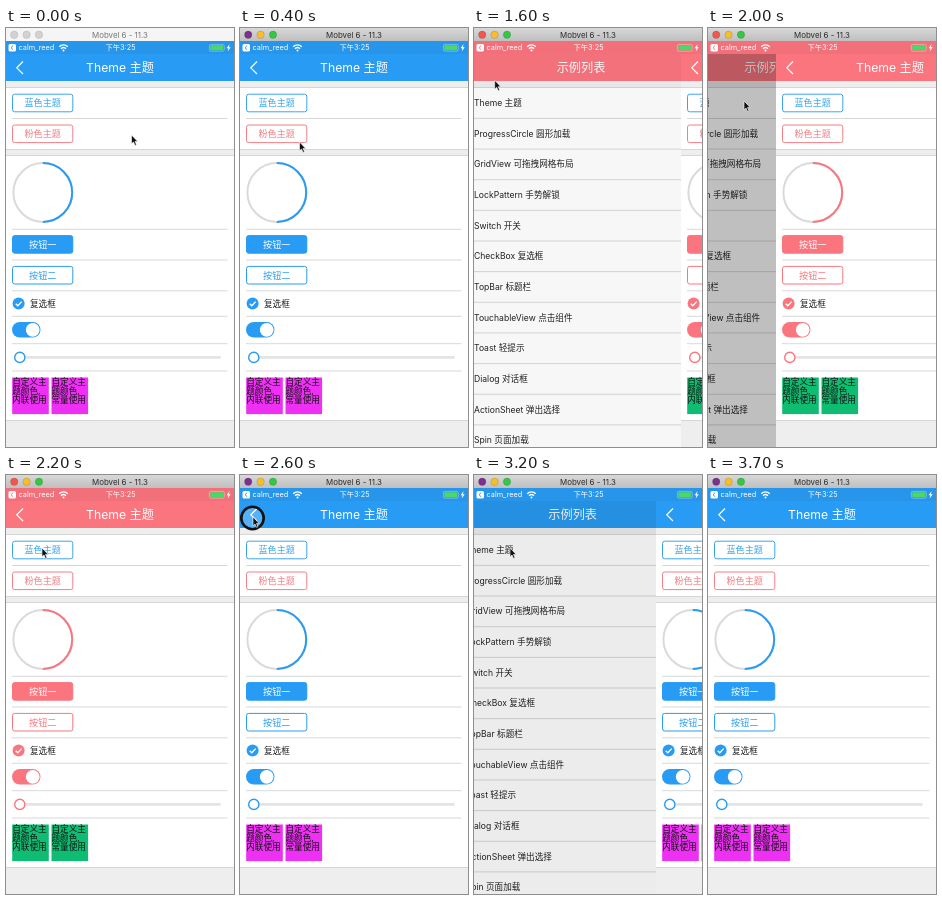
An HTML page for the animation above (3800 ms loop, 228 px wide and 419 px high).

```html
<!DOCTYPE html>
<html lang="zh-CN">
<head>
<meta charset="utf-8">
<title>Theme 主题</title>
<style>
  html, body { margin: 0; width: 100%; height: 100%; overflow: hidden; background: #eee; }
  svg { display: block; width: 100vw; height: 100vh; --main: #289bf4; --box: #ed30f3; --close: #7d3090; }
  svg.pink { --main: #fb757e; --box: #0fbd72; --close: #f0584f; }
  text { font-family: Inter, "Noto Sans CJK SC", "Noto Sans CJK", sans-serif; font-size: 8.6px; fill: #222; }
  .mid { text-anchor: middle; }
  .nav { font-size: 12.2px; fill: #fff; }
  .btn { font-size: 9.1px; }
  .fill { fill: var(--main); }
  .ink { stroke: var(--main); fill: none; }
  .line { stroke: #cfcfcf; stroke-width: .8; }
  .box { fill: var(--box); }
  .chev { stroke: #fff; stroke-width: 1.2; fill: none; }
  .status text { fill: #fff; font-size: 7.3px; }
  .idle .light { fill: #d2d2d2; stroke: #bcbcbc; }
  .idle .bar { fill: #f5f5f5; }
  .idle .name { fill: #777; }
  .light { stroke: #0003; stroke-width: .6; }
  .name { font-size: 7.9px; fill: #2b2b2b; }
</style>
</head>
<body>
<svg id="stage" viewBox="0 0 228 419" preserveAspectRatio="none">
  <defs>
    <linearGradient id="steel" x2="0" y2="1">
      <stop stop-color="#d8d8d8"/><stop offset="1" stop-color="#bfbfbf"/>
    </linearGradient>
  </defs>

  <g id="list">
    <rect y="13" width="228" height="406" fill="#fff"/>
    <rect y="53" width="228" height="6.5" fill="#eee"/>
    <rect class="fill" y="13" width="228" height="40"/>
    <text class="nav mid" x="114" y="44.3">示例列表</text>
    <g id="rows"></g>
  </g>
  <rect id="shade" y="26" width="228" height="393"/>

  <g id="page">
    <rect y="13" width="228" height="406" fill="#eeeeef"/>
    <rect y="59.5" width="228" height="62" fill="#fff"/>
    <rect y="127.5" width="228" height="265" fill="#fff"/>
    <g id="rules"></g>
    <rect class="fill" y="13" width="228" height="40"/>
    <path class="chev" d="M17 33.5 L10.8 39.8 L17 46"/>
    <text class="nav mid" x="114" y="44.3">Theme 主题</text>
    <g id="buttons"></g>

    <circle cx="36.8" cy="164.5" r="29.4" fill="none" stroke="#dadada" stroke-width="2"/>
    <path class="ink" stroke-width="2" d="M36.8 135.1 a29.4 29.4 0 0 1 0 58.8"/>

    <circle class="fill" cx="12.6" cy="275.5" r="6"/>
    <path d="M9.7 275.7 l2.1 2.1 l3.9 -4.2" fill="none" stroke="#fff" stroke-width="1.3"/>
    <text x="24" y="278.7">复选框</text>

    <rect class="fill" x="6" y="294" width="28.5" height="15.6" rx="7.8"/>
    <circle cx="26.7" cy="301.8" r="6.9" fill="#fff"/>

    <path d="M14 329.4 H213.5" stroke="#e4e4e4" stroke-width="2.6" stroke-linecap="round"/>
    <circle class="ink" cx="13.8" cy="329.4" r="5.1" stroke-width="1.4" style="fill:#fff"/>
    <g id="swatches"></g>
  </g>

  <g class="status">
    <rect y="13" width="228" height="13" fill="#000" opacity=".04"/>
    <rect x="2.5" y="16" width="7.5" height="7.5" rx="1.6" fill="#fff"/>
    <path class="ink" d="M7.2 17.6 L5 19.7 L7.2 21.8" stroke-width="1"/>
    <text x="12.6" y="22.4">calm_reed</text>
    <g fill="none" stroke="#fff" stroke-width="1.3">
      <path d="M53.2 18.7 a6 6 0 0 1 8.6 0 M55 20.7 a3.6 3.6 0 0 1 5 0"/>
    </g>
    <circle cx="57.5" cy="22.5" r="1" fill="#fff"/>
    <text class="mid" x="114.5" y="22.4">下午3:25</text>
    <rect x="203.3" y="16.4" width="15" height="6.8" rx="1.6" fill="none" stroke="#fff" stroke-opacity=".55" stroke-width=".6"/>
    <rect x="204.3" y="17.3" width="13" height="5" rx=".8" fill="#4bd865"/>
    <path d="M223.6 16 l-3 4.2 h1.8 l-.7 3.3 l3 -4.3 h-1.8 z" fill="#fff"/>
  </g>

  <g>
    <rect class="bar" width="228" height="13" fill="url(#steel)"/>
    <circle class="light" cx="8.2" cy="6.8" r="3.7" style="--c:0" fill="var(--close)"/>
    <circle class="light" cx="20.6" cy="6.8" r="3.7" fill="#f6bd2c"/>
    <circle class="light" cx="33" cy="6.8" r="3.7" fill="#35c744"/>
    <text class="name mid" x="114" y="9.7">Mobvel 6 - 11.3</text>
  </g>

  <g id="cursor">
    <circle id="ring" cx="-.5" cy="1" r="11.2" fill="#fff" fill-opacity=".22" stroke="#111" stroke-width="2.6"/>
    <path d="M0 0 V8.8 L2 7 L3.5 10.4 L5 9.7 L3.5 6.4 H6.2 Z" fill="#111" stroke="#fff" stroke-width=".6"/>
  </g>
</svg>

<script>
const $ = id => document.getElementById(id);
const LOOP = 3800, STEP = 100, WIDTH = 228;

const names = ['Theme 主题', 'ProgressCircle 圆形加载', 'GridView 可拖拽网格布局', 'LockPattern 手势解锁',
  'Switch 开关', 'CheckBox 复选框', 'TopBar 标题栏', 'TouchableView 点击组件', 'Toast 轻提示',
  'Dialog 对话框', 'ActionSheet 弹出选择', 'Spin 页面加载'];
const rule = (y, x1 = 0, x2 = WIDTH) => `<path class="line" d="M${x1} ${y} H${x2}"/>`;

$('rows').innerHTML = rule(59.5) + names.map((name, i) => {
  const y = 75 + i * 30.65;
  return `<text x="7" y="${y + 3.1}">${name}</text>` + rule(y + 15.4);
}).join('');

$('rules').innerHTML = [59.5, 121.5, 127.5, 392.5].map(y => rule(y)).join('') +
  [90.5, 201.3, 232, 262.8, 288.3, 315.7, 343].map(y => rule(y, 6, 221.5)).join('');

function button(y, label, color, solid) {
  return `<rect x="6.5" y="${y}" width="60.3" height="17.6" rx="2.2" stroke-width="1"
    style="stroke:${color};fill:${solid ? color : '#fff'}"/>
    <text class="btn mid" x="36.7" y="${y + 12.2}" style="fill:${solid ? '#fff' : color}">${label}</text>`;
}
$('buttons').innerHTML = button(66.2, '蓝色主题', '#39a4ee') + button(97, '粉色主题', '#f47f86') +
  button(207.6, '按钮一', 'var(--main)', true) + button(238.4, '按钮二', 'var(--main)');

$('swatches').innerHTML = [[6.2, '内联使用'], [45.5, '常量使用']].map(([x, last]) =>
  `<rect class="box" x="${x}" y="349.5" width="36.6" height="36.6"/>` +
  ['自定义主', '题颜色,', last].map((s, i) =>
    `<text x="${x}" y="${357.3 + i * 8.7}" style="fill:#111">${s}</text>`).join('')).join('');

// [time, page x]
const slide = [[0, 0], [1300, 0], [1400, 60], [1500, 160], [1600, 207], [1700, 228], [1800, 228],
  [1900, 182], [2000, 68], [2100, 14], [2200, 0], [2600, 0], [2700, 125], [2800, 207],
  [2900, 228], [3100, 228], [3200, 182], [3300, 68], [3400, 14], [3500, 0]];

// [time, x, y]
const path = [[0, 125.5, 107], [300, 59.5, 114], [700, 59.5, 114], [1200, 23.5, 54], [1300, 13, 42],
  [1500, 13, 42], [1800, 36, 73], [2400, 36, 73], [2600, 13, 42], [2800, 15.5, 44.5],
  [3000, 36, 73], [3300, 36, 73], [3600, 240, 200]];

const clicks = [500, 1300, 1800, 2300, 2600, 3100];

function at(table, t, col) {
  const i = table.findIndex(row => row[0] > t);
  if (i < 0) return table[table.length - 1][col];
  const a = table[i - 1], b = table[i], p = (t - a[0]) / (b[0] - a[0]);
  return a[col] + (b[col] - a[col]) * p;
}

function draw(t) {
  const x = at(slide, t, 1);
  $('stage').classList.toggle('pink', t >= 600 && t < 2400);
  $('stage').classList.toggle('idle', t < 300);
  $('page').setAttribute('transform', `translate(${x})`);
  $('list').setAttribute('transform', `translate(${(x - WIDTH) / 3})`);
  $('shade').setAttribute('opacity', (1 - x / WIDTH) * .36);
  $('cursor').setAttribute('transform', `translate(${at(path, t, 1)} ${at(path, t, 2)})`);
  $('ring').style.display = clicks.includes(t) ? '' : 'none';
}

const start = performance.now();
function tick(now) {
  const t = Math.max(0, now - start) % LOOP;
  draw(Math.floor(t / STEP) * STEP);
  requestAnimationFrame(tick);
}
draw(0);
requestAnimationFrame(tick);
</script>
</body>
</html>
```
